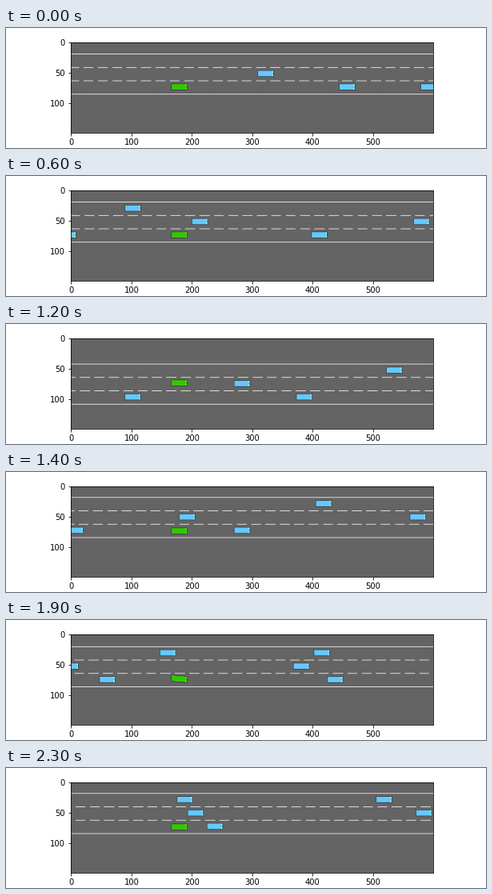
These frames come from a looping animation (600x150 px, 2400 ms). A matplotlib script:

```python
import matplotlib.pyplot as plt
import numpy as np
from matplotlib.animation import FuncAnimation

W, H, DPI = 600, 150, 72
FRAMES, INTERVAL = 24, 100
LANE = 22                      # lane width in road pixels
DASH, PITCH = 16.5, 23.8       # dash length and spacing
EGO = (180, 75)
FLOW = 9.2                     # road scroll per step on top of the ego's lead

ROAD, LINE, EDGE = (100, 100, 100), (255, 255, 255), (60, 60, 60)
BLUE, BLUE_LIGHT = (100, 200, 255), (147, 255, 255)
GREEN, GREEN_LIGHT = (50, 200, 0), (73, 255, 0)

# Lane changes of the ego car: step -> new lane (0 is the top lane).
MOVES = {-10: 2, 9: 1, 10: 0, 12: 1, 13: 2, 16: 1, 19: 2}

# Later traffic: each lane has its own drift and a few starting places.
STREAM = [
    (-7, [1158, 1413, 1743]),
    (6, [750, 1132, 1510]),
    (0, [925, 1302]),
]
# First cars: start, drift, lane, lane after the change.
FIRST = [(323, -2.5, 1, 0), (458, -6.5, 2, 1), (593, 4, 2, 2), (-15, 36, 2, 2)]
CARS = FIRST + [(x, drift, lane, lane)
                for lane, (drift, places) in enumerate(STREAM)
                for x in places]

Y, X = np.mgrid[:H, :W]


def lead(step):
    """Distance the ego car has gained on the traffic."""
    return np.interp(step, [0, 6, 9, 16, 19, 23], [0, 205, 383, 744, 864, 1063])


def smooth(t):
    t = np.clip(t, 0, 1)
    return t * t * (3 - 2 * t)


def ego_state(step):
    """Upper road edge and ego tilt; the view sways after a lane change."""
    done = [s for s in MOVES if s <= step]
    start, lane = done[-1], MOVES[done[-1]]
    age = step - start
    if age == 0:
        sway = 1 if lane > MOVES[done[-2]] else -2
    else:
        sway = -1 if age < 6 else 0
    tilt = 0.07 if age == 0 and lane == 2 else 0.0
    return 64 - LANE * lane + sway, tilt


def draw_road(img, top, phase):
    img[:] = ROAD
    dashed = (np.arange(W) - phase) % PITCH < DASH
    img[[top, top + 3 * LANE]] = LINE
    for i in (1, 2):
        img[top + i * LANE, dashed] = LINE


def draw_car(img, x, y, color, light, tilt=0.0):
    c, s = np.cos(tilt), np.sin(tilt)
    u = np.round((X - x) * c + (Y - y) * s)
    v = np.round((Y - y) * c - (X - x) * s)
    body = (u >= -14) & (u <= 12) & (v >= -6) & (v <= 4)
    lamps = body & (u >= 10) & (abs(abs(v + 1) - 3) <= 1)
    rim = body & ((u == -14) | (u == 12) | (v == -6) | (v == 4))
    img[body] = color
    img[lamps] = light
    img[rim] = EDGE


def render(step):
    img = np.empty((H, W, 3), np.uint8)
    top, tilt = ego_state(step)
    gain = lead(step)
    draw_road(img, top, 20.5 - gain - FLOW * step)
    for start, drift, lane, new_lane in CARS:
        x = round(start + drift * step - gain)
        lane += (new_lane - lane) * smooth((step - 1) / 3)
        draw_car(img, x, round(top + LANE * (lane + 0.5)), BLUE, BLUE_LIGHT)
    draw_car(img, *EGO, GREEN, GREEN_LIGHT, tilt)
    return img


fig, ax = plt.subplots(figsize=(W / DPI, H / DPI), dpi=DPI)
fig.subplots_adjust(left=0.125, right=0.9, bottom=0.125, top=0.88)
view = ax.imshow(render(0))
ax.set_xticks(range(0, W, 100))
ax.set_yticks(range(0, H, 50))


def update(step):
    view.set_data(render(step))
    return [view]


anim = FuncAnimation(fig, update, frames=FRAMES, interval=INTERVAL,
                     repeat=True, repeat_delay=0)
plt.show()
```
